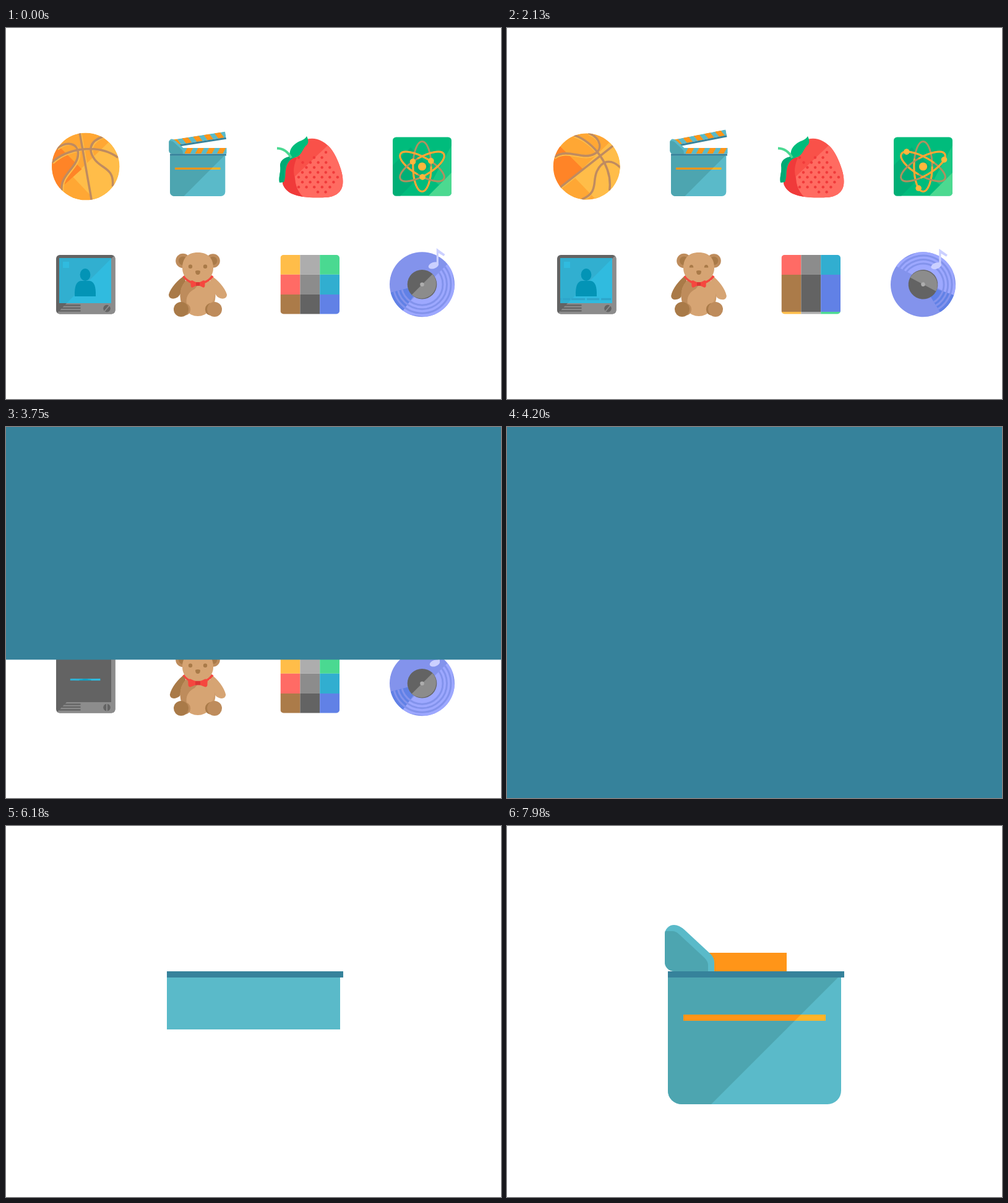
Animation of 800x600 px, one loop 8 s. Source, as an HTML page:

```html
<!DOCTYPE html>
<html lang="en">
<head>
<meta charset="utf-8">
<title>Icon loop</title>
<style>
html, body { margin: 0; width: 100%; height: 100%; overflow: hidden; background: #fff; }
svg { display: block; width: 100vw; height: 100vh; }
</style>
</head>
<body>
<svg id="stage" viewBox="0 0 800 600"></svg>
<script>
const LOOP = 8000, STEP = 30;
const TEAL = '#36829b', AQUA = '#5abac9', SEA = '#4da5b0', ORANGE = '#ff9518', AMBER = '#ffb428';

// ---------- markup helpers ----------
const attrs = o => Object.entries(o).map(([k, v]) => ` ${k}="${v}"`).join('');
const el = (tag, o, inner = '') => `<${tag}${attrs(o)}>${inner}</${tag}>`;
const path = (d, fill, o = {}) => el('path', { d, fill, ...o });
const line = (d, stroke, w, o = {}) =>
  el('path', { d, stroke, fill: 'none', 'stroke-width': w, ...o });
const rect = (x, y, width, height, fill, o = {}) => el('rect', { x, y, width, height, fill, ...o });
const circle = (cx, cy, r, fill, o = {}) => el('circle', { cx, cy, r, fill, ...o });
const oval = (cx, cy, rx, ry, fill, o = {}) => el('ellipse', { cx, cy, rx, ry, fill, ...o });
const group = (id, inner, o = {}) => el('g', { ...(id && { id }), ...o }, inner);
const clip = (id, inner) => el('clipPath', { id }, inner);
const clipped = id => ({ 'clip-path': `url(#${id})` });

// ---------- icons ----------
function ball() {
  const seams = 'M0-54V54M-51-15C-25-33 25-33 52-5' +
    'M-40-35C-20-46-5-36-8-22C-12 0-42 5-43 30' +
    'M35-41C12-38 8-24 16-8C24 8 44 10 36 38';
  return clip('ballClip', circle(0, 0, 52.6, '#000')) +
    group('ball', group('', circle(0, 0, 52.6, '#ffa734') +
      path('M-20 16L40-42L60-30V60H22Z', '#ffbd49') +
      path('M-46-36L-6 4L-44 38L-60 0Z', '#ff8427') +
      group('seams', line(seams, '#ffbd49', 2, { transform: 'translate(2.2 1.6)' }) +
        line(seams, '#bf8b60', 3.4)), clipped('ballClip')));
}

const bodyPath = (h, r) =>
  `M260 245H540V${245 + h - r}Q540 ${245 + h} ${540 - r} ${245 + h}H${260 + r}Q260 ${245 + h} 260 ${245 + h - r}Z`;
const roundBody = (h, r) =>
  `M260 245H540V${245 + h - r}A${r} ${r} 0 0 1 ${540 - r} ${245 + h}H${260 + r}A${r} ${r} 0 0 1 260 ${245 + h - r}Z`;
const SHADE = 'M260 245H535L330 450H260Z';
const hinge = path('M255 175A15 15 0 0 1 270 160Q278 160 287 168L329 207Q335 213 335 221V235H270A15 15 0 0 1 255 220Z', AQUA) +
  path('M255.6 170H267Q273 170 278 175L319 213Q325 219 325 225V235H270A15 15 0 0 1 255 220V174Z', SEA);
const titleBar = rect(285, 305, 230, 10, ORANGE) + path('M475 305H515V315H465Z', AMBER);

function stripes(x, y, w, n, first, lean) {
  let s = rect(x, y, w, 9.3, AQUA);
  for (let i = 0; i < n; i++)
    s += path(`M${first + i * 17.6} ${y}h9.5l${lean} 9.3h-9.5Z`, ORANGE);
  return s;
}

function clapper() {
  return clip('armClip', rect(266, 181, 90, 13)) + clip('lowClip', rect(286, 194, 70.5, 9.5)) +
    group('arm', group('', stripes(266, 181, 90, 5, 268, 5) + rect(266, 190.2, 90, 3, TEAL), clipped('armClip'))) +
    group('', stripes(286, 194, 71, 4, 293, -5), clipped('lowClip')) +
    group('', path(roundBody(205, 22), AQUA) +
      path('M260 245H535L330 450H282A22 22 0 0 1 260 428Z', SEA) +
      titleBar + hinge + rect(260, 235, 285, 10, TEAL),
      { transform: 'translate(265 203.4) scale(.319) translate(-260 -235)' });
}

function strawberry() {
  const body = 'M486 180C505 175 523 187 533 208C541 225 546 240 544 254C542 267 530 274 515 274C495 275 475 274 462 268C452 263 446 255 447 246C452 220 464 194 486 180Z';
  const rows = [[201, 517, 1], [209.5, 473, 1], [209.5, 498, 2], [217.5, 479.5, 1], [217.5, 492, 3],
    [225.5, 485.5, 4], [233.5, 479, 5], [241.3, 485.5, 5], [241.3, 473, 1], [249.3, 479, 5],
    [257.3, 473, 5], [265.3, 504, 2]];
  const seeds = rows.map(([y, x, n]) =>
    Array.from({ length: n }, (_, i) => circle(x + i * 12.6, y, 2.2, '#f03a3a')).join('')).join('');
  const leaf = 'M486 175C489 181 490 187 484 191C479 197 477 207 468 209C460 212 457 215 454 222C450 232 453 240 449 249L442 250C440 240 445 232 443 222C444 213 450 210 458 208C459 200 458 195 468 187C476 181 482 182 486 175Z';
  return clip('berryClip', path(body, '#000')) + path(body, '#f95149') +
    group('', path('M522 188L467 240Q466 262 484 276H560V190Z', '#ff6b61') +
      path('M440 210L470 210Q462 228 467 243Q468 262 482 276H440Z', '#f03a3a') + seeds, clipped('berryClip')) +
    path(leaf, '#00bc7b') +
    path('M443 222C444 213 450 210 458 208L462 211C456 214 452 222 451 230C449 240 451 246 449 249L442 250C440 240 445 232 443 222Z', '#00aa75') +
    group('stem', line('M438 194.5Q453 195 461 210', '#4ad991', 3.8));
}

function atom() {
  let orbits = '', dots = '';
  for (const a of [0, 120, 240]) {
    const o = { stroke: '#b0905f', 'stroke-width': 3, transform: `rotate(${a})` };
    orbits += oval(0, 0, 14.7, 40.5, 'none', o) +
      oval(0, 0, 14.7, 40.5, 'none', { ...o, stroke: '#faa834', pathLength: 360, 'stroke-dasharray': '205 155' });
    dots += group('', circle(0, 0, 4.8, '#ffb63c', { class: 'electron' }), { transform: `rotate(${a})` });
  }
  return clip('tile', rect(625, 176.5, 95, 95, '#000', { rx: 5.5 })) +
    group('', rect(625, 176, 95, 96, '#00bc7c') +
      path('M625 222L654 193L684 224L637 272H625Z', '#00af76') +
      path('M720 234V272H682Z', '#4cd990') + path('M720 190V236L700 254L690 245Z', '#4cd990', { opacity: .35 }), clipped('tile')) +
    group('', orbits + circle(0, 0, 6.6, '#ffb63c') + dots, { transform: 'translate(672.5 224)' });
}

function tv() {
  let grille = '';
  for (let i = 0; i < 3; i++) grille += rect(94 - i * 4, 447.3 + i * 4.5, 26.5 + i * 4, 2.3, '#636363');
  const caps = [[86, 5], [93, 12], [107, 22], [132, 20], [155, 16], [173, 20]]
    .map(([x, w]) => rect(x, 436.8, w, 3.4, '#2da6cb')).join('');
  return clip('tvClip', rect(81, 367, 95.5, 95.5, '#000', { rx: 6 })) +
    clip('screenClip', rect(86, 372, 84, 73)) +
    group('', rect(81, 367, 96, 96, '#636363') +
      path('M177 366V463H81L98 445H170V373Z', '#8c8c8c') + grille +
      circle(163, 453.6, 5.8, '#636363') +
      group('knob', line('M0-6V6', '#8c8c8c', 1.8)), clipped('tvClip')) +
    group('screen', group('', rect(86, 372, 84, 73, '#31afd0') + path('M170 373V445H98Z', '#30bbdf') +
      path('M111 434Q110 410 121 409H135Q146 410 145 434Z', '#0394b6') + oval(128, 399, 8.4, 10, '#0394b6') +
      group('caps', caps) + rect(92, 378, 10, 10, '#30bbdf', { id: 'mark' }), clipped('screenClip')));
}

function bear() {
  const tan = '#d6a473', mid = '#be8c5c', dark = '#a97a48', red = '#f5473f';
  const arm = 'M289 400C278 407 266 420 263 431C263 439 272 439 278 435C284 428 286 424 291 420Z';
  const eye = x => circle(x, 385.7, 3.2, dark);
  const shut = x => path(`M${x - 3.3} 387.5A3.3 4.6 0 0 1 ${x + 3.3} 387.5Z`, dark);
  return clip('bellyClip', oval(310, 433, 28.5, 33, '#000')) +
    group('armL', path(arm, dark)) +
    group('armR', path(arm, tan, { transform: 'translate(620 0) scale(-1 1)' })) +
    group('', rect(280, 398, 60, 70, tan) +
      path('M280 398H325L305 422Q289 430 292 447L296 470H280Z', mid) +
      path('M340 420V470H316Q334 452 340 420Z', mid, { opacity: .35 }), clipped('bellyClip')) +
    circle(288, 455, 10.2, mid) + circle(283, 455, 12, dark) +
    circle(332, 455, 10.2, dark) + circle(337, 455, 12, mid) +
    circle(286, 376.5, 11.8, mid) + circle(286, 376.5, 7, dark) +
    circle(334.5, 376.5, 11.3, mid) + circle(334.5, 376.5, 6.8, dark) +
    line('M287 401Q296 413 310 413T334 401', red, 4.2) +
    path('M310 363C327 363 335 373 335 388C335 402 325 411 310 411S285 402 285 388C285 373 293 363 310 363Z', tan) +
    group('open', eye(298) + eye(322)) + group('shut', shut(298) + shut(322)) +
    path('M306 393Q310 391 314 393Q314 399 310 399T306 393Z', dark) +
    group('bow', path('M-3-2.5L-12-6.5Q-17-7-15.5 0Q-16 7-12 6.5L-3 3Z', red) +
      path('M3-2.5L12-6.5Q17-7 15.5 0Q16 7 12 6.5L3 3Z', red) +
      rect(-4, -3.2, 8, 6.6, '#dd3535'));
}

const rowColors = {
  sun: ['#ffbd49', '#adadad', '#4ad991'],
  rose: ['#ff6b65', '#8c8c8c', '#31aed0'],
  wood: ['#ab7b49', '#636363', '#6181e6']
};
const row = (id, key) => group(id, rowColors[key].map((c, i) => rect(443.5 + i * 31.85, 0, 31.85, 1, c)).join(''));
const palette = () => clip('palClip', rect(443.5, 367, 95.5, 95.5, '#000', { rx: 5 })) +
  group('', row('sunTop', 'sun') + row('rose', 'rose') + row('wood', 'wood') + row('sunLow', 'sun'), clipped('palClip'));

function vinyl() {
  const ring = (c, list) => list.map(r => circle(0, 0, r, 'none', { stroke: c, 'stroke-width': 3 })).join('');
  return clip('half', path('M46-38L-38 46L60 60Z', '#000')) + clip('wedge', path('M0 0L-70 18L-60 44L-38 52Z', '#000')) +
    group('disc', circle(0, 0, 52.5, '#8393ec') +
      group('', circle(0, 0, 52.5, '#9da8ff') + ring('#8393ec', [33.5, 40, 46.5]), clipped('half')) +
      group('', circle(0, 0, 52.5, '#6181e6') + ring('#8393ec', [33.5, 40, 46.5]), clipped('wedge')) +
      circle(0, 0, 23.8, '#636363') + path('M16.8-16.8A23.8 23.8 0 0 1-16.8 16.8Z', '#8c8c8c') +
      circle(0, 0, 3.3, '#adadad')) +
    Array.from({ length: 5 }, () => group('', oval(0, 0, 8.6, 5, '#cbd0ff', { transform: 'rotate(-20)' }) +
      path('M4.8-28L8-25.5L18.5-18L16.5-15L8-20V-1H4.8Z', '#cbd0ff'), { class: 'note' })).join('');
}

// ---------- closing build ----------
const build = () => clip('bodyClip', path('', '#000', { id: 'bodyEdge' })) +
  clip('lineClip', rect(285, 305, 0, 10, '#000', { id: 'lineEdge' })) + clip('aboveBar', rect(200, 100, 400, 135)) +
  group('build', path('', AQUA, { id: 'body' }) +
    group('', path(SHADE, SEA, { id: 'shade' }), clipped('bodyClip')) +
    group('', titleBar, clipped('lineClip')) +
    rect(322, 205, 0, 30, ORANGE, { id: 'strip' }) +
    group('', group('hinge', hinge), clipped('aboveBar')));

const stage = document.getElementById('stage');
stage.innerHTML = group('icons', ball() + clapper() + strawberry() + atom() + tv() + bear() + palette() + vinyl()) +
  build() + rect(0, 0, 0, 0, TEAL, { id: 'sheet' });

// ---------- motion ----------
const $ = id => document.getElementById(id);
const put = (node, o) => { for (const k in o) node.setAttribute(k, o[k]); };
const move = (id, transform) => put($(id), { transform });
const show = (id, on) => put($(id), { visibility: on ? 'inherit' : 'hidden' });
const sine = x => (1 - Math.cos(Math.PI * x)) / 2;
const flat = x => x;

// keys: [time, value], eased between neighbours
function at(t, keys, ease = sine) {
  if (t <= keys[0][0]) return keys[0][1];
  for (let i = 1; i < keys.length; i++) {
    const [a, va] = keys[i - 1], [b, vb] = keys[i];
    if (t <= b) return va + (vb - va) * ease((t - a) / (b - a));
  }
  return keys[keys.length - 1][1];
}

function bounce(x) {
  if (x <= 0) return 0;
  if (x >= 1) return 1;
  const k = 7.5625, d = 2.75;
  if (x < 1 / d) return k * x * x;
  if (x < 2 / d) return k * (x - 1.5 / d) ** 2 + .75;
  if (x < 2.5 / d) return k * (x - 2.25 / d) ** 2 + .9375;
  return k * (x - 2.625 / d) ** 2 + .984375;
}

// [time, x, y, scale] of each floating note
const notes = [
  [[-1, 691, 384, 1], [0, 691, 384, 1], [250, 703, 374, 1.1], [600, 728, 358, 0]],
  [[850, 646, 432, 0], [1290, 620, 441, 1], [1650, 604, 474, 0]],
  [[1850, 688, 395, 0], [2250, 695, 382, 1.25], [2745, 725, 359, 0]],
  [[2450, 684, 396, 0], [2730, 690, 387, 1.3], [3150, 722, 362, 0]],
  [[3450, 688, 394, 0], [3750, 693, 382, 1], [4100, 715, 366, 0]]
];

function icons(t) {
  const size = at(t, [[0, 1.038], [150, 1.11], [420, 1], [1700, 1], [1950, 1.07], [2250, 1], [2760, 1], [3000, 1.11], [3250, 1]]);
  move('ball', `translate(128.7 224) scale(${size})`);
  move('seams', `rotate(${at(t, [[0, -10], [620, 85], [1660, 85], [2730, 3], [3200, -10]])})`);

  const arm = at(t, [[0, -8.8], [200, -4], [1700, -4], [2100, -11.5], [2300, -4], [2740, -4], [3050, -16.5], [3240, -4]]);
  move('arm', `rotate(${arm} 268 186)`);
  move('stem', `rotate(${at(t, [[840, 0], [1050, 4], [1260, 0], [1440, -3], [1600, 0]])} 461 210)`);

  const phi = at(t, [[0, -13], [1290, -343], [2730, -783.5], [4200, -1230]], flat) * Math.PI / 180;
  for (const e of document.querySelectorAll('.electron'))
    put(e, { cx: 14.7 * Math.cos(phi), cy: 40.5 * Math.sin(phi) });

  show('mark', t < 600 || t > 1800);
  show('caps', t > 300);
  move('caps', `translate(${at(t, [[300, 85], [800, 0], [1650, 0], [2730, -7], [3500, -7]])})`);
  const sx = at(t, [[3690, 1], [3810, 0]], x => x * .833), sy = at(t, [[3540, 1], [3690, .048]]);
  const wide = at(t, [[3660, 1], [3750, .583], [3840, 0]], flat);
  move('screen', `translate(128 408.5) scale(${Math.min(wide, Math.max(sx, wide))} ${sy}) translate(-128 -408.5)`);
  move('knob', `translate(163 453.6) rotate(${at(t, [[3480, 40], [3600, 0]])})`);

  const shut = t > 480 && t < 2880;
  show('open', !shut);
  show('shut', shut);
  const wave = at(t, [[0, 0], [300, -4], [700, 0], [1700, 0], [2200, -5], [2730, -2], [3200, 0], [3750, -4]]);
  move('armL', `rotate(${wave} 290 406)`);
  move('armR', `rotate(${-wave} 330 406)`);
  const bow = at(t, [[0, .74], [400, 1], [1700, 1], [2200, .74], [2900, .74], [3400, 1]]);
  move('bow', `translate(310 414) scale(${bow} ${.5 + bow / 2})`);

  const top = at(t, [[1140, 31.8], [1440, 0], [3330, 0], [3600, 31.8]]);
  const mid = at(t, [[1560, 431], [2000, 399], [2940, 399], [3300, 431]]);
  const low = at(t, [[2050, 0], [2400, 31.8], [2640, 31.8], [2730, 25.5], [2910, 0]]);
  const span = (id, y0, y1) => move(id, `translate(0 ${y0}) scale(1 ${Math.max(0, y1 - y0)})`);
  span('sunTop', 367, 367 + top);
  span('rose', 367 + top, mid);
  span('wood', mid, 463 - low);
  span('sunLow', 463 - low, 463);

  move('disc', `translate(672.5 414.7) rotate(${at(t, [[0, 0], [1290, 183], [2730, 303], [3750, 360]], flat)})`);
  document.querySelectorAll('.note').forEach((n, i) => {
    const k = notes[i], v = j => at(t, k.map(p => [p[0], p[j]]));
    put(n, { transform: `translate(${v(1)} ${v(2)}) scale(${v(3)})` });
  });
}

function sheet(t) {
  let x0 = 0, x1 = 800, y0 = 0, y1 = 600 * bounce((t - 3568) / 632);
  if (t >= 4470) {
    x0 = at(t, [[4470, 0], [4770, 274], [4980, 258], [5130, 260]]);
    x1 = at(t, [[4470, 800], [4815, 546], [4950, 541], [5130, 545]]);
    const p = at(t, [[4565, 0], [4952, 1]]);
    y0 = 235 * p;
    y1 = 600 - 355 * p;
  }
  put($('sheet'), { x: x0, y: y0, width: x1 - x0, height: y1 - y0 });
}

function slate(t) {
  const h = at(t, [[5829, 0], [6622, 205]]);
  const r = at(t, [[6450, 0], [6800, 22]]);
  const d = roundBody(h, r);
  put($('body'), { d });
  put($('bodyEdge'), { d });
  move('shade', `translate(${at(t, [[6480, -280], [6900, 0]])} 0)`);
  put($('lineEdge'), { width: at(t, [[6920, 0], [7320, 230]]) });
  move('hinge', `translate(${at(t, [[7700, 5], [7760, 0]])} ${at(t, [[7320, 80], [7740, -6], [7880, 0]])})`);
  put($('strip'), { width: at(t, [[7740, 0], [7980, 130]]) });
}

function frame() {
  const t = Math.floor(performance.now() % LOOP / STEP) * STEP;
  const early = t < 4200;
  show('icons', early);
  show('build', t > 5800);
  if (early) icons(t); else slate(t);
  sheet(t);
  requestAnimationFrame(frame);
}
frame();
</script>
</body>
</html>
```
